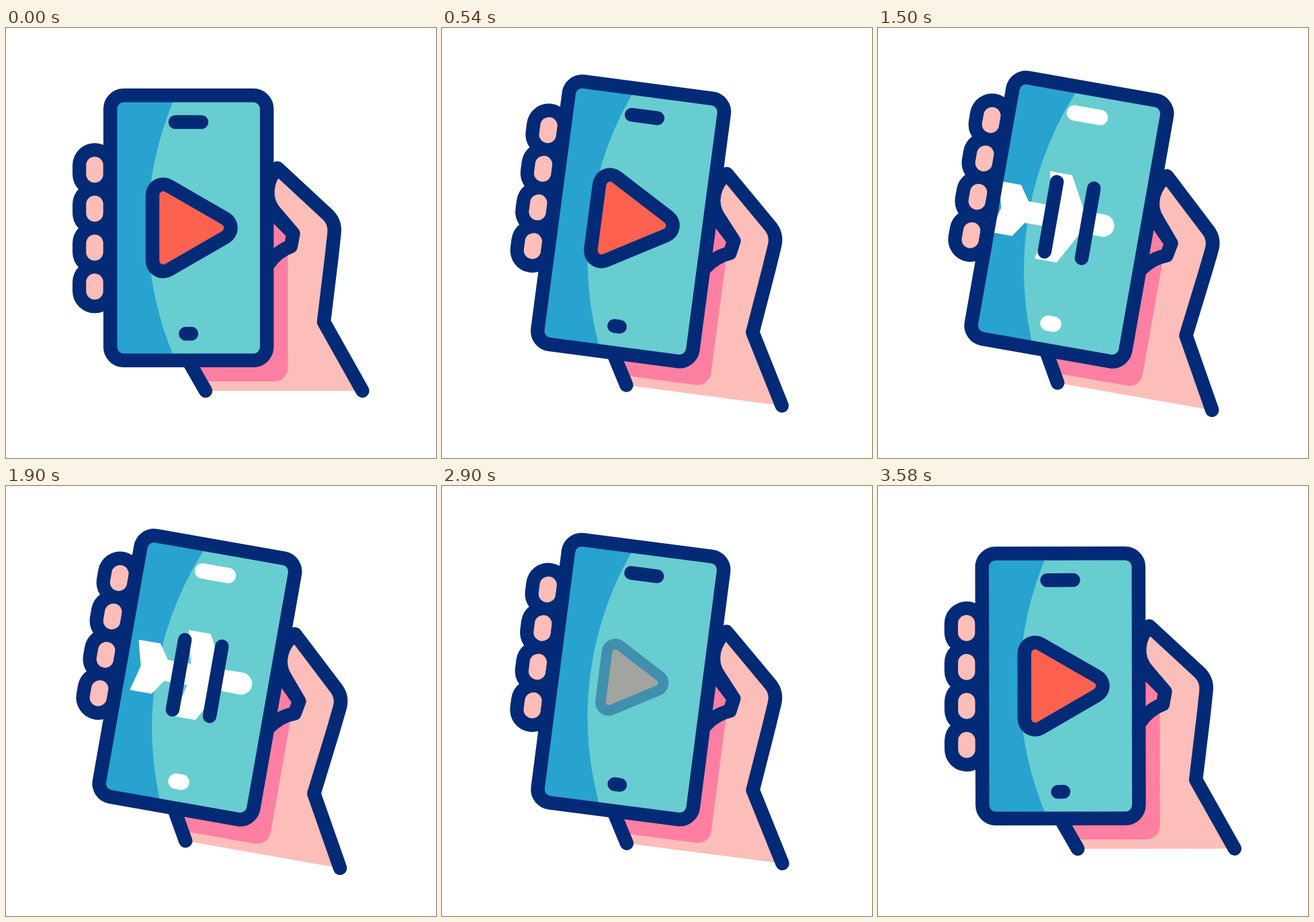
Recreate the animation shown at these times as an HTML page with a canvas. Size 640 by 640 pixels, loop 3.6 s.

```html
<!DOCTYPE html>
<html lang="en">
<head>
<meta charset="utf-8">
<title>Phone in hand</title>
<style>
  html, body { margin: 0; width: 100%; height: 100%; overflow: hidden; background: #fff; }
  canvas { display: block; width: 640px; height: 640px; }
</style>
</head>
<body>
<canvas id="stage" width="640" height="640"></canvas>
<script>
const ctx = document.getElementById('stage').getContext('2d');
const LOOP = 3600, LINE = 20.5;
const NAVY = '#032a76', SKIN = '#fdbeb9', SHADE = '#ff7fa3', RED = '#ff6150';
const TEAL = '#67cdd1', BLUE = '#28a2ce', WHITE = '#fff';
const PIVOT = { x: 349.5, y: 364.2 };

// Keys are [time, value]; values ease in and out between them.
const TRACKS = {
  tilt: [[0, 0], [200, -16], [620, 10], [2800, 10], [3240, -10.2], [3600, 0]],
  slide: [[0, 0], [200, 35], [620, -39], [2800, -39], [3240, 24.5], [3600, 0]],
  thumb: [[620, 0], [940, 1], [1100, 0], [2200, 0], [2540, 1], [2700, 0]],
  play: [[910, 1], [1310, 0], [2740, 0], [3120, 1]],
  pause: [[1200, 0], [1500, 1], [2510, 1], [2910, 0]],
  plane: [[2510, 1], [2910, 0]],
  lights: [[1100, 0], [1400, 1], [2570, 1], [2870, 0]],
  entry: [[910, 0], [1600, 1]]
};

const lerp = (a, b, k) => a + (b - a) * k;
const ease = k => k * k * (3 - 2 * k);

function valueAt(keys, t) {
  if (t <= keys[0][0]) return keys[0][1];
  for (let i = 1; i < keys.length; i++) {
    const [t0, v0] = keys[i - 1], [t1, v1] = keys[i];
    if (t < t1) return lerp(v0, v1, ease((t - t0) / (t1 - t0)));
  }
  return keys[keys.length - 1][1];
}

function fill(path, color) {
  ctx.fillStyle = color;
  ctx.fill(path);
}

function stroke(path, color = NAVY, width = LINE) {
  ctx.strokeStyle = color;
  ctx.lineWidth = width;
  ctx.stroke(path);
}

function polygon(points) {
  const path = new Path2D();
  points.forEach(p => path.lineTo(...p));
  path.closePath();
  return path;
}

function line(x0, y0, x1, y1, color, width) {
  const path = new Path2D();
  path.moveTo(x0, y0);
  path.lineTo(x1, y1);
  stroke(path, color, width);
}

function withAlpha(alpha, draw) {
  if (alpha <= 0) return;
  ctx.save();
  ctx.globalAlpha = alpha;
  draw();
  ctx.restore();
}

function drawHand(lift) {
  const at = (x0, y0, x1, y1) => [lerp(x0, x1, lift), lerp(y0, y1, lift)];
  const wrist = [473, 437.5], fold = [424, 325];
  const side = at(484.8, 340, 500.5, 321);
  const crease = at(427.5, 306, 432, 281);
  const web = at(380, 258, 380, 253);
  const cuff = [530.5, 540];

  fill(polygon([[255, 470], [297, 540], cuff, wrist, side, fold, [390, 350]]), SKIN);

  const shade = new Path2D();
  shade.moveTo(...web);
  shade.lineTo(419.5, crease[1]);
  shade.arcTo(419.5, 526, 290, 526, 20);
  shade.lineTo(290, 526);
  shade.lineTo(262, 478);
  fill(shade, SHADE);

  const thumb = new Path2D();
  thumb.moveTo(...wrist);
  thumb.lineTo(...side);
  thumb.lineTo(...at(488.5, 306, 507, 298));
  thumb.quadraticCurveTo(...at(490.5, 290, 512, 283), ...at(480, 279, 506, 270));
  thumb.lineTo(...at(404, 208.5, 445.5, 203));
  thumb.bezierCurveTo(...at(388, 225, 413, 196), ...at(382, 255, 405, 240), ...at(402, 276, 421, 258));
  thumb.lineTo(...crease);
  thumb.lineTo(...fold);

  const flesh = new Path2D(thumb);
  flesh.lineTo(424, 437);
  fill(flesh, SKIN);

  const outline = new Path2D(thumb);
  outline.quadraticCurveTo(...at(404, 332, 407, 328), ...at(390, 352, 390, 334.5));
  outline.moveTo(...wrist);
  outline.lineTo(...cuff);
  outline.moveTo(...web);
  outline.lineTo(...crease);
  outline.moveTo(262, 479);
  outline.lineTo(297, 540);
  stroke(outline);
}

function drawFingers(slide) {
  for (const [color, width] of [[NAVY, 66], [SKIN, 25.5]]) {
    for (let i = 0; i < 4; i++) {
      const y = 204.3 + 58 * i + slide;
      line(132, y, 132, y + 13.2, color, width);
    }
  }
}

function drawPlane(t, alpha) {
  const entry = valueAt(TRACKS.entry, t);
  const drift = (Math.max(t, 1600) - 1900) / 660;
  const scale = 1 - 0.035 * drift;
  const half = [[-76, 0], [-86, 38], [-53, 38], [-38, 16], [-3, 16], [-15, 65], [18, 65], [45, 16]];
  const body = new Path2D();
  half.forEach(p => body.lineTo(...p));
  body.arc(75.5, 0, 16.5, Math.PI / 2, -Math.PI / 2, true);
  half.slice(1).reverse().forEach(([x, y]) => body.lineTo(x, -y));
  body.closePath();
  withAlpha(alpha, () => {
    ctx.translate(262.2 + 8.5 * drift - 212 * (1 - entry), 295.1 - 6.6 * drift - 7 * (1 - entry));
    ctx.scale(scale, scale);
    fill(body, WHITE);
  });
}

function drawPlay(alpha) {
  const size = 0.62 + 0.38 * alpha;
  const path = new Path2D();
  path.moveTo(218, 297.5);
  path.arcTo(218, 221, 350.5, 297.5, 16);
  path.arcTo(350.5, 297.5, 218, 374, 16);
  path.arcTo(218, 374, 218, 221, 16);
  path.closePath();
  // An opaque group: the fill stops at the inner edge of the outline.
  withAlpha(alpha, () => {
    ctx.translate(275, 298);
    ctx.scale(size, size);
    ctx.translate(-275, -298);
    const inner = new Path2D();
    inner.moveTo(228, 297.5);
    inner.arcTo(228, 238.5, 330, 297.5, 6);
    inner.arcTo(330, 297.5, 228, 356.5, 6);
    inner.arcTo(228, 356.5, 228, 238.5, 6);
    inner.closePath();
    fill(inner, RED);
    stroke(path);
  });
}

function drawLights(color, width) {
  line(252, 140, 291, 140, color, width);
  line(267.5, 455, 276, 455, color, width);
}

function drawPhone(t) {
  const frame = new Path2D();
  frame.roundRect(155.2, 100.3, 233, 394.5, 20);
  fill(frame, TEAL);

  ctx.save();
  ctx.clip(frame);
  const glare = new Path2D();
  glare.moveTo(150, 90);
  glare.lineTo(256, 90);
  glare.arc(702, 298, 491, Math.PI + 0.437, Math.PI - 0.437, true);
  glare.lineTo(150, 510);
  fill(glare, BLUE);
  drawPlane(t, valueAt(TRACKS.plane, t));
  ctx.restore();

  stroke(frame);
  drawLights(NAVY, LINE);
  withAlpha(valueAt(TRACKS.lights, t), () => drawLights(WHITE, 23));
  withAlpha(valueAt(TRACKS.pause, t), () => {
    line(244, 245.5, 244, 351, NAVY, LINE);
    line(300, 245.5, 300, 351, NAVY, LINE);
  });
  drawPlay(valueAt(TRACKS.play, t));
}

function draw(now) {
  const t = now % LOOP;
  ctx.setTransform(1, 0, 0, 1, 0, 0);
  ctx.fillStyle = WHITE;
  ctx.fillRect(0, 0, 640, 640);
  ctx.lineCap = ctx.lineJoin = 'round';
  ctx.translate(PIVOT.x, PIVOT.y);
  ctx.rotate(valueAt(TRACKS.tilt, t) * Math.PI / 180);
  ctx.translate(-PIVOT.x, -PIVOT.y);
  drawHand(valueAt(TRACKS.thumb, t));
  drawFingers(valueAt(TRACKS.slide, t));
  drawPhone(t);
}

let start;
function tick(now) {
  start ??= now;
  draw(now - start);
  requestAnimationFrame(tick);
}
draw(0);
requestAnimationFrame(tick);
</script>
</body>
</html>
```
